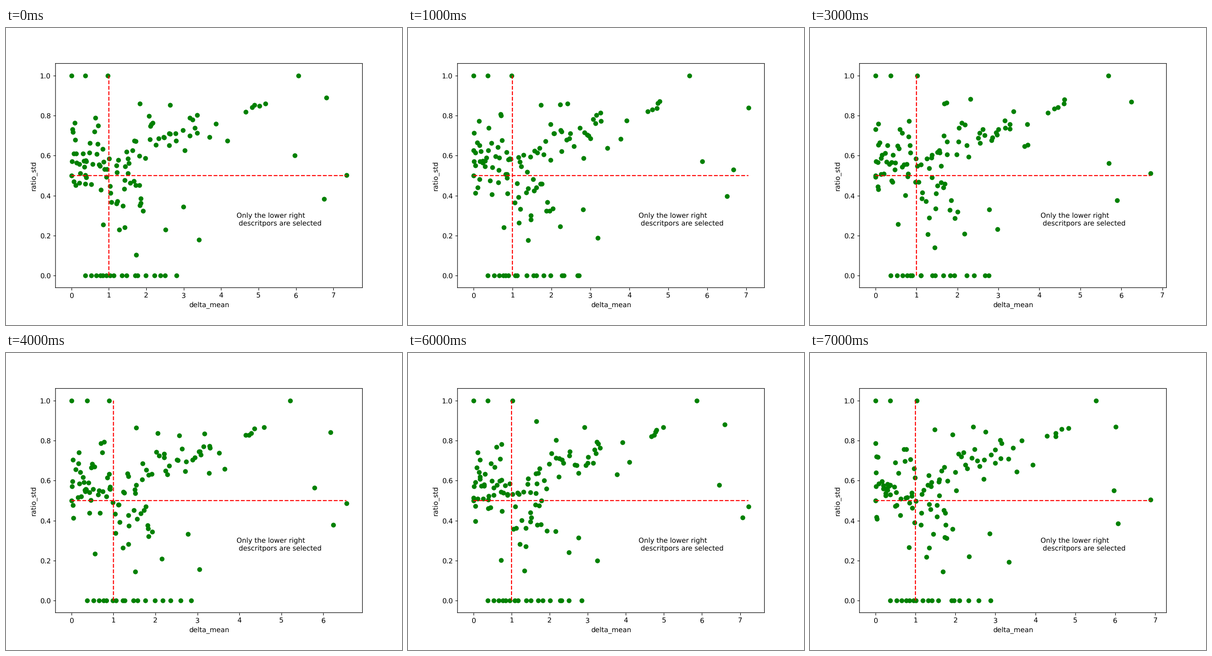
Recreate the animation shown at these times as a matplotlib script. Size 864 by 648 pixels, loop 8000 ms.

```python
import numpy as np
import matplotlib.pyplot as plt
from matplotlib.animation import FuncAnimation

plt.rcParams["font.family"] = "DejaVu Sans"
plt.rcParams["path.snap"] = False
plt.rcParams["text.hinting"] = "none"

STEP_MS = 1000

# Largest delta_mean of each run; it sets the scale of the x axis.
REACH = [7.35, 7.06, 6.77, 6.71, 6.55, 6.69, 7.22, 6.88]

# Key points, with x as a share of the reach.
TAIL = np.array([(0.96, 0.87), (0.87, 0.58), (1.00, 0.50), (0.95, 0.37)])
STRAYS = np.array([
    (0.46, 0.20), (0.33, 0.22), (0.23, 0.16), (0.10, 0.25), (0.29, 0.32),
    (0.41, 0.36), (0.24, 0.87), (0.35, 0.86), (0.30, 0.82), (0.44, 0.80),
    (0.54, 0.77), (0.52, 0.65), (0.56, 0.67)])


def spread(rng, n, lo, hi, power=1.0):
    """n values from lo to hi, evenly stratified, denser at lo if power > 1."""
    return lo + (hi - lo) * ((np.arange(n) + rng.random(n)) / n) ** power


def jitter(rng, pts, dx, dy):
    return pts + rng.normal(0, 1, pts.shape) * (dx, dy)


def row(x, y):
    return np.column_stack([x, np.broadcast_to(y, np.shape(x))])


def make_cloud():
    """Dense part shared by all runs: left heap, low middle, rising band."""
    rng = np.random.default_rng(11)
    left = spread(rng, 38, 0, 1, 1.25)
    mid = spread(rng, 17, 0.95, 1.95)
    band = spread(rng, 33, 1.15, 3.4, 1.1)
    return np.vstack([
        row(left, np.clip(rng.normal(0.575, 0.085, left.size), 0.42, 0.79)),
        row(mid, np.clip(rng.normal(0.39, 0.075, mid.size), 0.24, 0.52)),
        row(band, 0.48 + 0.08 * band + rng.normal(0, 0.045, band.size))])


CLOUD = make_cloud()


def make_run(i):
    rng = np.random.default_rng(100 + i)
    reach = REACH[i]

    cloud = jitter(rng, CLOUD, 0.06, 0.025)
    cloud[:, 0] = np.abs(cloud[:, 0])

    tail = jitter(rng, TAIL, 0.03, 0.025)
    tail[:, 0] /= tail[:, 0].max()
    share = np.linspace(0.63, 0.69, 5)
    rise = jitter(rng, row(share, 0.82 + 0.8 * (share - 0.63)), 0.006, 0.006)
    strays = jitter(rng, STRAYS, 0.02, 0.02)
    far = np.vstack([tail, rise, strays]) * (reach, 1)

    zeros = np.append([0.37, 0.53, 0.66, 0.77], spread(rng, 13, 0.8, 2.9, 1.3))
    ones = [0, 0.37, rng.normal(0.95, 0.05), reach * rng.normal(0.81, 0.04)]
    return np.vstack([cloud, far, [(0, 0.5), (0.01, 0.57)],
                      row(zeros, 0), row(ones, 1)])


runs = [make_run(i) for i in range(len(REACH))]

fig = plt.figure(figsize=(8, 6), dpi=108)
ax = fig.add_axes([0.125, 0.1257, 0.775, 0.7548])
ax.set_xlabel("delta_mean")
ax.set_ylabel("ratio_std")
ax.set_ylim(-0.0607, 1.0607)
dots = ax.scatter([], [], color="green")
across, = ax.plot([], [], "r--")
ax.plot([1, 1], [0, 1], "r--")
note = ax.text(0, 0.25, "Only the lower right\n descritpors are selected")


def draw(i):
    reach = REACH[i]
    dots.set_offsets(runs[i])
    across.set_data([0, reach], [0.5, 0.5])
    note.set_x(0.6 * reach)
    ax.set_xlim(-0.058 * reach, 1.058 * reach)
    return dots, across, note


anim = FuncAnimation(fig, draw, frames=len(REACH), interval=STEP_MS,
                     repeat=True, repeat_delay=0, blit=False)
plt.show()
```
